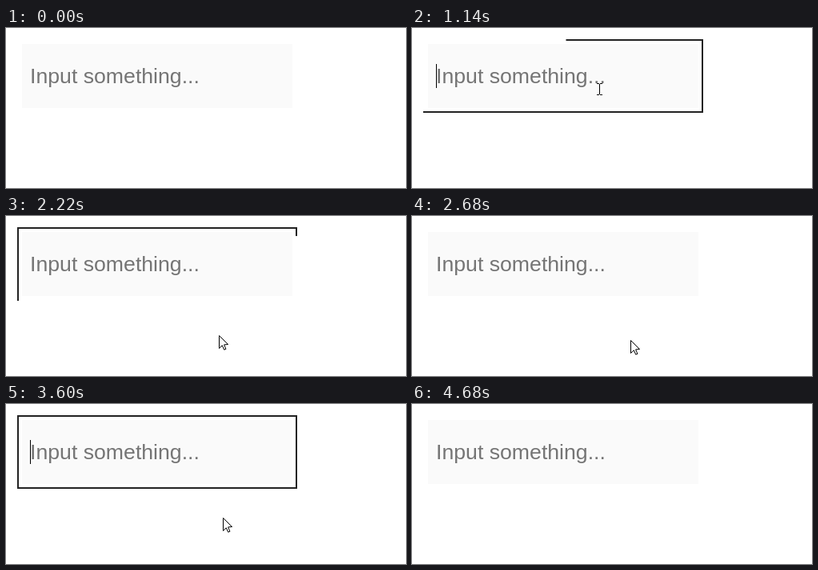
These frames come from a looping animation (500x200 px, 5.31 s). An HTML page with a canvas:

```html
<!DOCTYPE html>
<html lang="en">
<head>
<meta charset="utf-8">
<title>Input border</title>
<style>
  html, body { margin: 0; width: 100%; height: 100%; overflow: hidden; background: #fff; }
  canvas { display: block; width: 500px; height: 200px; }
</style>
</head>
<body>
<canvas id="stage"></canvas>
<script>
const LOOP = 5310, FIRST = 288, STEP = 77;
const SIDE = 100, BLINK = 505;
const FIELD = { x: 20, y: 20, w: 338, h: 80 };
const BORDER = { l: 14, t: 14, r: 364, b: 106, line: 2 };

const sessions = [{ focus: 886, blur: 2025 }, { focus: 3130, blur: 4165 }];

// Pointer stops, eased from one to the next
const stops = [
  { at: 288, x: 382, y: 190 },
  { at: 750, x: 234, y: 76 },
  { at: 1135, x: 234, y: 76 },
  { at: 1674, x: 266, y: 149 },
  { at: 2598, x: 266, y: 149 },
  { at: 2675, x: 273, y: 155 },
  { at: 3060, x: 277, y: 82 },
  { at: 3291, x: 277, y: 82 },
  { at: 3599, x: 271, y: 142 },
  { at: 3907, x: 280, y: 162 },
  { at: 4215, x: 280, y: 162 },
  { at: 4600, x: 357, y: 198 }
];

const arrow = new Path2D('M.5 .5V16.5L4.3 12.8L6.7 18.2L8.9 17.3L6.6 11.9L11.5 11.5Z');

const canvas = document.getElementById('stage');
const ctx = canvas.getContext('2d', { alpha: false });
const ratio = window.devicePixelRatio || 1;
canvas.width = 500 * ratio;
canvas.height = 200 * ratio;
ctx.scale(ratio, ratio);

const clamp = v => Math.min(1, Math.max(0, v));
const ease = p => p * p * (3 - 2 * p);

function rect(color, x, y, w, h) {
  ctx.fillStyle = color;
  ctx.fillRect(x, y, w, h);
}

// Head and tail run round the box from the bottom left, one unit per side
function drawBorder(head, tail) {
  const { l, t, r, b, line } = BORDER, w = r - l, h = b - t;
  for (let i = 0; i < 4; i++) {
    const from = clamp(tail - i), to = clamp(head - i), len = to - from;
    if (len <= 0) continue;
    if (i === 0) rect('#222', l + w * from, b - line, w * len, line);
    if (i === 1) rect('#222', r - line, b - h * to, line, h * len);
    if (i === 2) rect('#222', r - w * to, t, w * len, line);
    if (i === 3) rect('#222', l, t + h * from, line, h * len);
  }
}

function drawField() {
  rect('#fafafa', FIELD.x, FIELD.y, FIELD.w, FIELD.h);
  ctx.font = '26.667px "Liberation Sans", Arial, sans-serif';
  ctx.fillStyle = '#757575';
  ctx.fillText('Input something...', 30, 69);
}

function drawCaret(time, { focus, blur }) {
  const lit = Math.floor((time - focus) / BLINK) % 2 === 0;
  if (time >= focus && time < blur && lit) rect('#000', 30, 45, 1, 30);
}

function drawArrow(x, y) {
  ctx.save();
  ctx.translate(x, y);
  ctx.fillStyle = '#fff';
  ctx.fill(arrow);
  ctx.strokeStyle = '#000';
  ctx.stroke(arrow);
  ctx.restore();
}

function drawBeam(x, y) {
  rect('#000', x, y - 6, 1, 13);
  for (const dy of [-7, 7]) {
    rect('#000', x - 3, y + dy, 3, 1);
    rect('#000', x + 1, y + dy, 3, 1);
  }
}

function drawPointer(time) {
  const i = stops.findIndex(s => s.at >= time);
  if (i < 0 || time < stops[0].at) return;
  const b = stops[i], a = stops[Math.max(0, i - 1)];
  const p = a === b ? 1 : ease((time - a.at) / (b.at - a.at));
  const x = Math.round(a.x + (b.x - a.x) * p);
  const y = Math.round(a.y + (b.y - a.y) * p);
  const inside = x > FIELD.x && x < FIELD.x + FIELD.w && y > FIELD.y && y < FIELD.y + FIELD.h;
  (inside ? drawBeam : drawArrow)(x, y);
}

function draw(now) {
  const time = FIRST + Math.floor((now % LOOP - FIRST) / STEP) * STEP;
  rect('#fff', 0, 0, 500, 200);
  drawField();
  for (const s of sessions) {
    drawBorder((time - s.focus) / SIDE, (time - s.blur) / SIDE);
    drawCaret(time, s);
  }
  drawPointer(time);
}

const start = performance.now();
function tick() {
  draw(performance.now() - start);
  requestAnimationFrame(tick);
}
tick();
</script>
</body>
</html>
```
